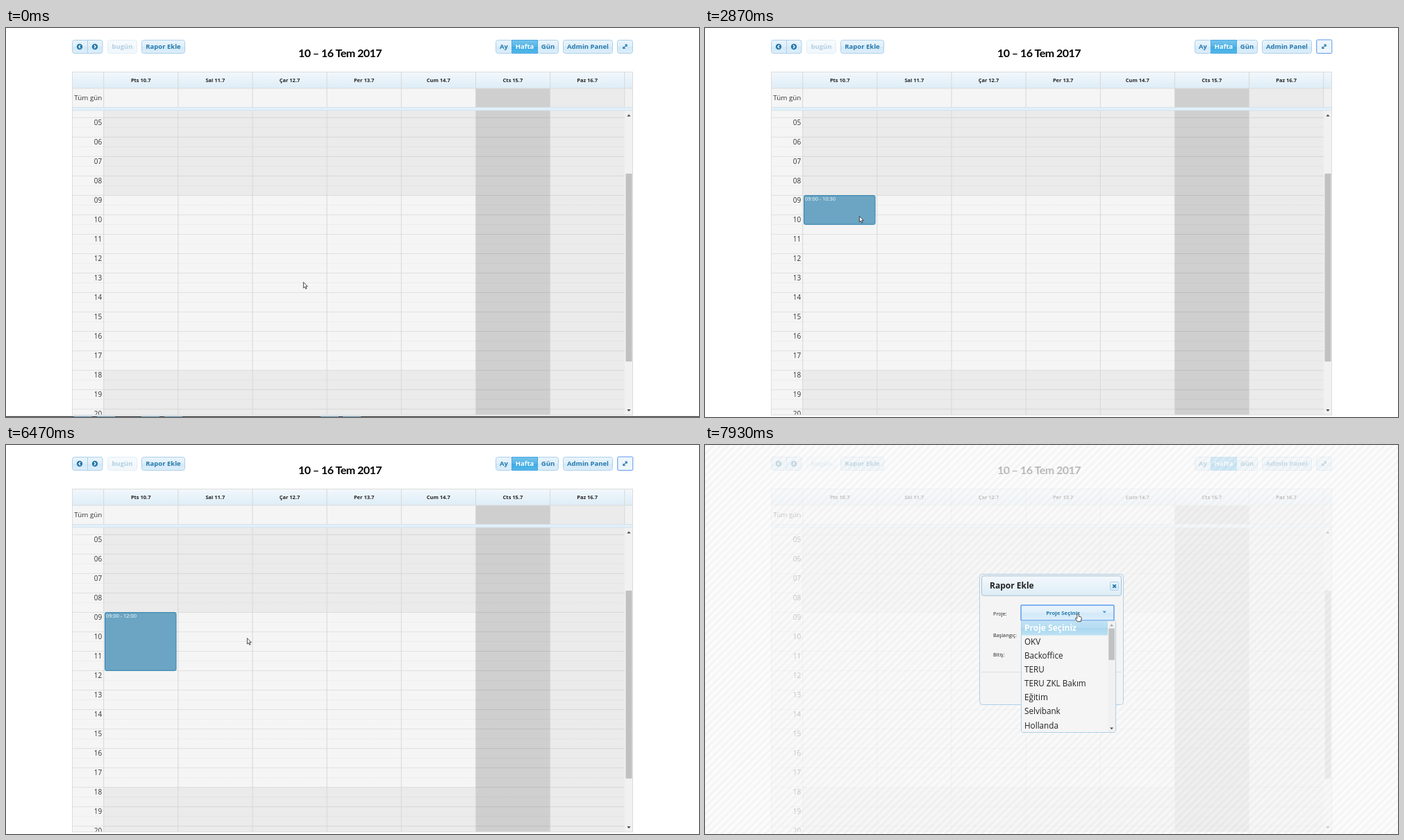
Recreate the animation shown at these times as an HTML page. Size 998 by 561 pixels, loop 8000 ms.

```html
<!DOCTYPE html>
<html lang="tr">
<head>
<meta charset="utf-8">
<style>
html, body { margin: 0; width: 100%; height: 100%; overflow: hidden; background: #fff; }
svg { display: block; font-family: "Open Sans", "Noto Sans", sans-serif; }
</style>
</head>
<body>
<svg id="stage" width="998" height="561" viewBox="0 0 998 561"></svg>
<script>
const LOOP = 8000, TICK = 200 / 3;
const HOUR = 28.03, FIRST = 129.3, NINE = FIRST + 4 * HOUR;
const BLUE = '#2779aa', EDGE = '#aed0ea', LINE = '#dcdcdc';

const rect = (x, y, w, h, fill, extra = '') =>
  `<rect x="${x}" y="${y}" width="${w}" height="${h}" fill="${fill}" ${extra}/>`;
const path = (d, extra) => `<path d="${d}" ${extra}/>`;
// cy is the middle of the capitals
const text = (x, cy, size, str, fill = '#222', extra = '') =>
  `<text x="${x}" y="${cy + size * .36}" font-size="${size}" fill="${fill}" ${extra}>${str}</text>`;
const BOLD = 'font-weight="700"', MID = 'text-anchor="middle"', END = 'text-anchor="end"';
const box = (x, y, w, h, fill, stroke, r = 3) =>
  rect(x, y, w, h, fill, `stroke="${stroke}" rx="${r}"`);
const button = (x, w, label) => box(x, 17.5, w, 19, 'url(#glass)', EDGE) +
  text(x + w / 2, 27, 9.5, label, BLUE, `${BOLD} ${MID}`);
const triangle = (x, y, w, h, fill) =>
  path(`M${x - w},${y - h / 2} h${2 * w} l${-w},${h}z`, `fill="${fill}"`);
const gradient = (id, stops) => `<linearGradient id="${id}" x2="0" y2="1">` +
  stops.map(([at, c]) => `<stop offset="${at}" stop-color="${c}"/>`).join('') + '</linearGradient>';

const defs = '<defs>' +
  gradient('glass', [[0, '#e9f4fc'], [.5, '#dfeffa'], [.5, '#d3e9f8'], [1, '#dceefa']]) +
  gradient('active', [[0, '#74c3eb'], [.5, '#55b5e6'], [.5, '#3baae3'], [1, '#55b7e8']]) +
  gradient('head', [[0, '#f3f8fc'], [.45, '#e9f3fa'], [1, '#deedf7']]) +
  gradient('pick', [[0, '#c0e2f4'], [.5, '#b4dcf1'], [.5, '#a9d7ef'], [1, '#bce1f4']]) +
  `<pattern id="stripes" width="7.35" height="7.35" patternUnits="userSpaceOnUse" patternTransform="rotate(45)">
    ${rect(0, 0, 7.35, 7.35, '#fbfbfb')}${rect(0, 0, 3.7, 7.35, '#f2f2f2')}</pattern>
  <clipPath id="grid">${rect(95, 119, 808, 439, '#000')}</clipPath></defs>`;

function toolbar() {
  const arrow = (x, dir) => `<circle cx="${x}" cy="27" r="4.2" fill="${BLUE}"/>` +
    path(`M${x + dir},24.8 l${-2 * dir},2.2 l${2 * dir},2.2`, 'fill="none" stroke="#fff" stroke-width="1.3"');
  return box(95.5, 17.5, 43.5, 19, 'url(#glass)', EDGE) + rect(117, 18, 1, 18, EDGE) +
    arrow(106, 1) + arrow(128, -1) +
    `<g opacity=".35">${button(146.5, 42, 'bugün')}</g>` +
    button(195.5, 62, 'Rapor Ekle') +
    text(481, 36.5, 16, '10 – 16 Tem 2017', '#000',
      `${BOLD} ${MID} letter-spacing="-.5" font-family="Lato, sans-serif"`) +
    button(705.5, 23, 'Ay') + button(765.5, 30, 'Gün') +
    rect(728.5, 17.5, 37, 19, 'url(#active)', 'stroke="#4aa8e4"') +
    text(747, 27, 9.5, 'Hafta', '#fff', `${BOLD} ${MID}`) +
    button(802.5, 71, 'Admin Panel') + button(880.5, 22, '') +
    `<g id="focus">${box(880.8, 17, 22, 19.5, '#eef6fd', '#5f9bf0', 1.5)}</g>` +
    path('M889.5,28.8 l4,-4 M891.4,24.2 h2.7 v2.7 M891.6,29.4 h-2.7 v-2.7',
      `fill="none" stroke="${BLUE}" stroke-width="1.2"`);
}

function calendar() {
  const col = i => 140.7 + 107.15 * i;
  const days = ['Pts', 'Sal', 'Çar', 'Per', 'Cum', 'Cts', 'Paz'];
  const six = FIRST + 13 * HOUR;
  let s = rect(95, 63, 808, 495, '#f5f5f5') + rect(95, 63, 808, 24, 'url(#head)');
  s += rect(141, 119, 536, NINE - 119, '#ebebeb') + rect(141, six, 536, 558 - six, '#ebebeb');
  s += rect(676.5, 87, 107, 471, '#cfcfcf') + rect(783.5, 87, 108, 471, '#ebebeb');
  s += rect(891, 87, 12, 471, '#f1f1f1');

  s += '<g clip-path="url(#grid)">';
  for (let i = 0; i <= 15; i++) {
    const y = FIRST + HOUR * i;
    s += path(`M95,${y} H891`, 'stroke="#000" stroke-opacity=".09"');
    s += path(`M95,${y + HOUR / 2} H891`, 'stroke="#000" stroke-opacity=".07" stroke-dasharray="1 1"');
    s += text(138.3, y + 7, 10, String(i + 5).padStart(2, 0), '#333', END);
  }
  s += '</g>';

  days.forEach((d, i) => {
    s += rect(col(i) - .5, 63, 1, 495, '#d8d8d8') +
      text(col(i) + 53.5, 75.5, 7.5, `${d} ${10 + i}.7`, '#222', `${BOLD} ${MID}`);
  });
  s += rect(890.2, 63, 1, 56, '#d8d8d8') + rect(95, 86.5, 808, 1, LINE);
  s += text(138.3, 100, 9.8, 'Tüm gün', '#333', END);
  s += rect(95, 114, 808, 5, '#e2f0f9') + rect(95, 114, 808, .8, '#cfdfea') + rect(95, 118.5, 808, .8, '#cfdfea');
  s += rect(892.5, 210, 9, 271, '#c1c1c1') + triangle(897, 126, 2.6, -3, '#444') + triangle(897, 551.5, 2.6, 3, '#444');
  return s + rect(95.5, 63.5, 807, 494.5, 'none', `stroke="${LINE}"`);
}

const selection = `<g id="event">
  <rect id="block" x="142.5" y="${NINE + .2}" width="102.5" rx="2" fill="#6ba5c3" stroke="#2e80b0"/>
  ${text(144, 246.5, 7.4, '', '#fff', 'id="range"')}</g>`;

function taskbar() {
  const tabs = [98, 131, 195, 228, 453, 485];
  return '<g id="taskbar">' + rect(0, 559.8, 998, 1.2, '#3c4044') +
    tabs.map(x => rect(x, 559.4, 26, 1.2, '#a9d6ef')).join('') + '</g>';
}

function dialog() {
  const field = (y, label, value) => text(415, y, 7.3, label) +
    box(455.5, y - 10.8, 134, 21.6, '#fff', '#cfcfcf', 2) +
    text(522.5, y, 8.2, value, '#555', MID);
  return box(395.5, 186.5, 207, 188, '#f4f4f4', EDGE, 4) +
    box(398.5, 188.8, 201, 28.4, 'url(#head)', '#a8bfce') +
    text(410, 203, 12, 'Rapor Ekle', '#222', BOLD) +
    box(583.5, 197.5, 12, 12, 'url(#glass)', EDGE, 2) +
    path('M587.3,201.3 l4.6,4.6 m0,-4.6 l-4.6,4.6', `stroke="${BLUE}" stroke-width="1.9"`) +
    text(415, 243.8, 7.3, 'Proje:') +
    rect(455, 231, 134, 22, 'url(#glass)', 'stroke="#5c9df2" stroke-width="1.5" rx="1"') +
    text(515.5, 242, 7.8, 'Proje Seçiniz', BLUE, `${BOLD} ${MID}`) +
    triangle(575.2, 241, 2.8, 3.2, '#3a9bd8') +
    field(274, 'Başlangıç:', '2017-07-10 09:00') +
    field(302.5, 'Bitiş:', '2017-07-10 12:00') +
    rect(398, 327, 202, 1, '#dedede') +
    box(535.5, 337.5, 48.5, 23, 'url(#glass)', EDGE) +
    text(559.7, 349, 12, 'Ekle', BLUE, `${BOLD} ${MID}`);
}

function menu() {
  const items = ['OKV', 'Backoffice', 'TERU', 'TERU ZKL Bakım', 'Eğitim', 'Selvibank', 'Hollanda'];
  return box(455.5, 253.5, 136, 161, '#f5f5f5', EDGE, 2) +
    rect(456, 254, 124, 20.5, 'url(#pick)') +
    text(460, 263.8, 12, 'Proje Seçiniz', '#fff', BOLD) +
    items.map((name, i) => text(460, 284 + 20.05 * i, 11.7, name)).join('') +
    rect(580, 254, 11, 160, '#f1f1f1') + rect(581.3, 264.5, 8.6, 45.5, '#c1c1c1') +
    triangle(585.6, 259.8, 2.4, -2.8, '#999') + triangle(585.6, 408.8, 2.4, 2.8, '#444');
}

const pointer = '<g id="cursor" fill="#fff" stroke="#222" stroke-width=".8" stroke-linejoin="round">' +
  path('M.4,.6 V9 L2.3,7.2 L3.7,10.3 L5,9.7 L3.7,6.7 H6.3Z', 'id="arrow"') +
  path('M-1.2,1 Q0,-.6 1.2,1 V4.2 L4.4,5 Q5.4,5.4 5.2,7 L4.3,11.6 H-.6 L-3.5,7.7 Q-3.8,6.3 -2.5,6.4 L-1.2,7.4Z', 'id="hand"') +
  '</g>';

document.getElementById('stage').innerHTML = defs + rect(0, 0, 998, 561, '#fff') +
  toolbar() + calendar() + selection + taskbar() +
  `<g id="modal">${rect(0, 0, 998, 561, 'url(#stripes)', 'opacity=".75"')}${dialog()}</g>` +
  `<g id="menu">${menu()}</g>` + pointer;

const el = id => document.getElementById(id);
const show = (id, on) => el(id).setAttribute('visibility', on ? 'visible' : 'hidden');

// Pointer moves: start, end, x, y
const moves = [
  [133, 1000, 227, 253], [1000, 1133, 226, 251], [1200, 1333, 224, 250], [1400, 1467, 223, 250],
  [1600, 1667, 224, 252], [1933, 2333, 222.5, 261], [2400, 2533, 222, 265.5], [2600, 2933, 222, 271.5],
  [3000, 3733, 221, 287], [3867, 4267, 220, 300], [4600, 4867, 218, 310], [5067, 5133, 217.5, 311],
  [5200, 5267, 218, 311.2], [5400, 5533, 218, 313], [6000, 6467, 347, 278], [6800, 7333, 537, 242],
  [7867, 7933, 537, 243]
];

function pointerAt(t) {
  let x = 428, y = 366;
  for (const [from, to, tx, ty] of moves) {
    if (t <= from) break;
    const p = Math.min(1, (t - from) / (to - from)), k = p * p * (3 - 2 * p);
    x += (tx - x) * k;
    y += (ty - y) * k;
  }
  return [x, y];
}

function draw(ms) {
  const t = Math.floor((ms + 4) / TICK) * TICK;
  const [x, y] = pointerAt(t);
  const modal = t > 6500, hand = modal && x > 455 && y < 253;

  // The selection ends with the half hour under the pointer until release
  const dragY = pointerAt(Math.min(t, 5900))[1];
  const slots = Math.max(1, Math.floor((dragY - NINE) / (HOUR / 2)) + 1);
  const end = `${String(9 + (slots >> 1)).padStart(2, 0)}:${slots % 2 ? '30' : '00'}`;
  el('block').setAttribute('height', slots * HOUR / 2 - .4);
  el('range').textContent = '09:00 - ' + (slots > 1 ? end : '');

  show('event', t > 1650 && t < 7450);
  show('taskbar', t < 1650);
  show('focus', t > 1650 && !modal);
  show('modal', modal);
  show('menu', t > 7580);
  show('arrow', !hand);
  show('hand', hand);
  el('cursor').setAttribute('transform', `translate(${x} ${y})`);
}

function loop() {
  draw(performance.now() % LOOP);
  requestAnimationFrame(loop);
}
loop();
</script>
</body>
</html>
```
